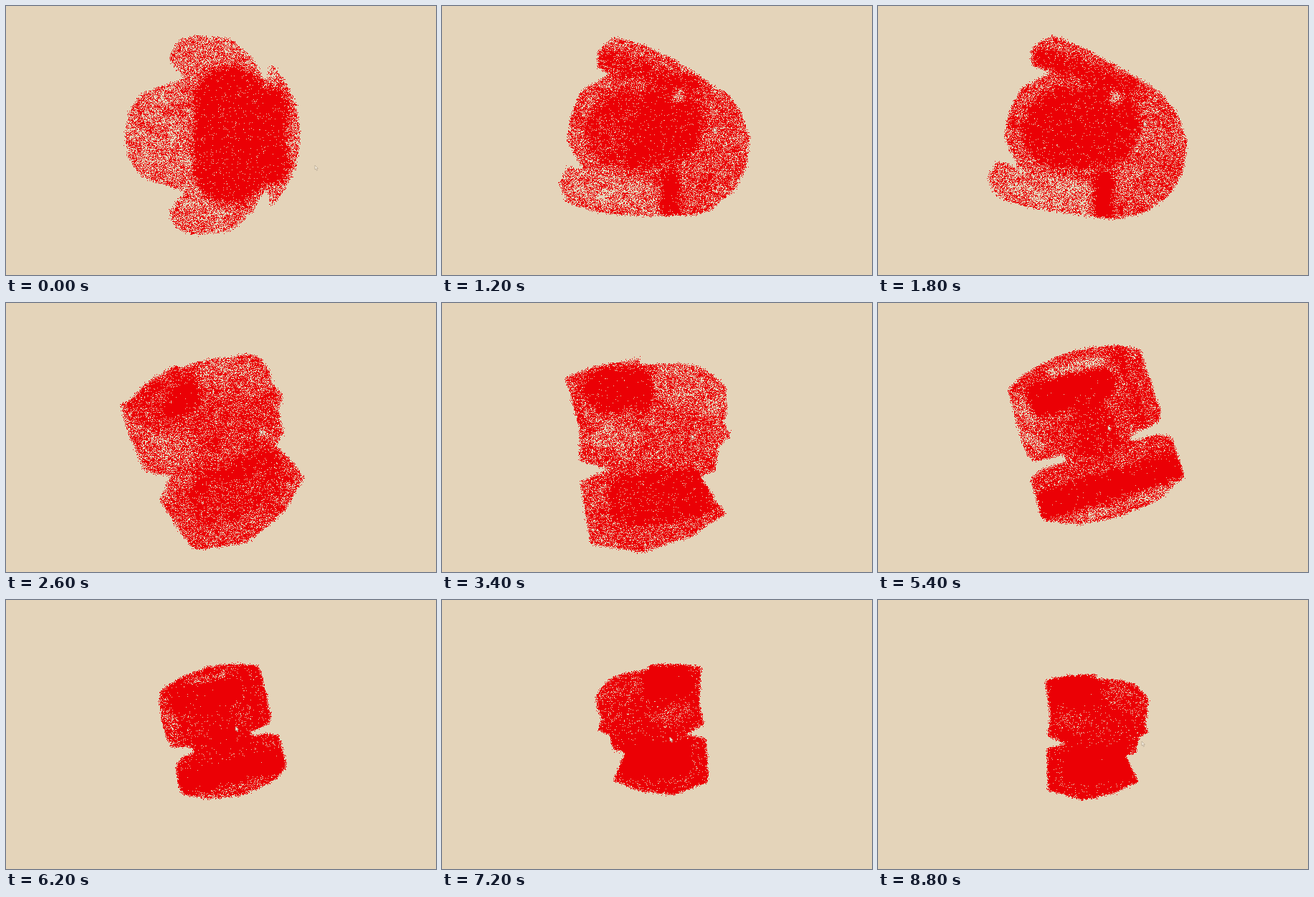
Animation of 600 by 375 pixels, one loop 9 s. Source, as an HTML page with a canvas:

```html
<!DOCTYPE html>
<html lang="en">
<head>
<meta charset="utf-8">
<title>Rotating point cloud bust</title>
<style>
  html, body { margin: 0; width: 100%; height: 100%; overflow: hidden; background: #e4d4ba; }
  canvas { display: block; }
</style>
</head>
<body>
<canvas id="stage" width="600" height="375"></canvas>
<script>
const W = 600, H = 375, LOOP = 9000, STEP = 200, SAMPLES = 200;

const lerp = (a, b, w) => a + (b - a) * w;
const parse = text => text.split(' ').map(pair => pair.split(',').map(Number));

// Mirrors an outline left to right; it still starts at the top and runs clockwise.
const mirror = ([first, ...rest]) => [first, ...rest.reverse()].map(([x, y]) => [-x, y]);
const symmetric = half => [...half, ...mirror(half).slice(1)];

// Spreads points evenly along a closed outline, so that any two outlines can blend.
function resample(points) {
  const sides = points.map((a, i) => {
    const b = points[(i + 1) % points.length];
    return { a, b, length: Math.hypot(b[0] - a[0], b[1] - a[1]) };
  });
  const gap = sides.reduce((sum, side) => sum + side.length, 0) / SAMPLES;
  let i = 0, passed = 0;
  return Array.from({ length: SAMPLES }, (_, n) => {
    while (passed + sides[i].length < n * gap) passed += sides[i++].length;
    const { a, b, length } = sides[i], w = (n * gap - passed) / length;
    return [lerp(a[0], b[0], w), lerp(a[1], b[1], w)];
  });
}

// Views of the bust, upright around 0,0. Folds: density, width, line from, line to.
const views = {
  crown: {
    outline: symmetric(parse('0,-137 28,-134 58,-114 79,-53 106,-76 130,-66 139,-41 134,10 108,40 80,56 72,60 100,67 78,85 42,102 0,108')),
    base: .53,
    folds: [[.97, 105, -46, 10, 46, 10], [.98, 44, -48, 70, 48, 70]]
  },
  tilted: {
    outline: symmetric(parse('0,-126 36,-122 69,-90 72,-120 96,-125 119,-106 118,-60 102,30 92,66 72,98 40,122 0,130')),
    base: .7,
    folds: [
      [.48, 46, -93, -109, -81, 15], [.97, 112, 0, -50, 22, 0],
      [.95, 30, 86, -105, 86, 20], [1, 28, -46, 29, -111, 48], [0, 13, 66, 7, 66, 8]
    ]
  },
  profile: {
    outline: parse('-5,-134 -2,-125 53,-120 81,-111 110,-82 108,-48 101,-32 110,-11 90,0 82,34 59,38 88,95 38,120 -32,135 -104,114 -107,26 -64,14 -105,-3 -99,-48 -110,-120 -67,-131'),
    base: .76,
    folds: [
      [.98, 60, -60, -98, -15, -92], [.58, 50, 36, -96, 92, -64],
      [.55, 36, -67, -33, -33, -24], [.97, 75, -37, 60, 40, 60]
    ]
  },
  front: {
    outline: symmetric(parse('0,-145 45,-140 82,-131 112,-117 115,-8 104,8 56,12 55,24 95,24 120,34 120,104 70,127 0,134')),
    base: .7,
    folds: [
      [.98, 55, -62, -85, 32, -81], [.9, 60, 5, -40, 5, 10], [.25, 16, -39, -122, 48, -118],
      [.45, 28, -103, -91, -94, -10], [.97, 9, 77, -115, 82, 0],
      [.97, 46, -117, 80, 122, 82], [.4, 16, -95, 122, 115, 116]
    ]
  }
};
views.reverse = {
  ...views.profile,
  outline: mirror(views.profile.outline),
  folds: views.profile.folds.map(([density, width, x1, y1, x2, y2]) => [density, width, -x1, y1, -x2, y2])
};
for (const view of Object.values(views)) view.outline = resample(view.outline);

const keys = [
  { time: 0, view: 'crown', scale: 1, turn: -90, x: 303, y: 180, pointer: [431, 222] },
  { time: 1800, view: 'tilted', scale: 1, turn: -71, x: 303, y: 188, pointer: [371, 161] },
  { time: 3400, view: 'profile', scale: 1, turn: -7, x: 296, y: 210, pointer: [348, 183] },
  { time: 4600, view: 'front', scale: 1, turn: -17, x: 303, y: 187, pointer: [320, 173] },
  { time: 4800, view: 'front', scale: 1.14, turn: -17, x: 303, y: 187, pointer: [320, 172] },
  { time: 5000, view: 'front', scale: 1.14, turn: -17, x: 303, y: 187, pointer: [321, 171] },
  { time: 6000, view: 'front', scale: .66, turn: -17, x: 302, y: 188, pointer: [321, 171] },
  { time: 7200, view: 'reverse', scale: .68, turn: -5, x: 294, y: 182, pointer: [318, 191] },
  { time: 7700, view: 'front', scale: .64, turn: 10, x: 300, y: 193, pointer: [335, 194] },
  { time: 8800, view: 'profile', scale: .65, turn: 0, x: 305.5, y: 191, pointer: [368, 197] }
];

function layer() {
  const canvas = document.createElement('canvas');
  canvas.width = W;
  canvas.height = H;
  return canvas.getContext('2d', { willReadFrequently: true });
}

const stage = document.getElementById('stage').getContext('2d');
const shade = layer(), field = layer();

const setPose = (ctx, { x, y, turn, scale }) =>
  ctx.setTransform(new DOMMatrix().translate(x, y).rotate(turn).scale(scale));

function fillShape(ctx, points) {
  ctx.beginPath();
  points.forEach(([x, y]) => ctx.lineTo(x, y));
  ctx.closePath();
  ctx.fill();
}

const grey = density => `hsl(0 0% ${density * 100}%)`;

function addShade({ base, folds }, pose, weight) {
  shade.resetTransform();
  shade.filter = 'none';
  shade.fillStyle = grey(base);
  shade.fillRect(0, 0, W, H);
  setPose(shade, pose);
  shade.filter = `blur(${4 * pose.scale}px)`;
  shade.lineCap = 'round';
  for (const [density, width, x1, y1, x2, y2] of folds) {
    shade.strokeStyle = grey(density);
    shade.lineWidth = width;
    shade.beginPath();
    shade.moveTo(x1, y1);
    shade.lineTo(x2, y2);
    shade.stroke();
  }
  field.globalAlpha = weight;
  field.drawImage(shade.canvas, 0, 0);
  field.globalAlpha = 1;
}

function hash(x, y, seed) {
  let h = Math.imul(x, 374761393) ^ Math.imul(y, 668265263) ^ Math.imul(seed + 1, 974634777);
  h = Math.imul(h ^ h >>> 13, 1274126177);
  h = Math.imul(h ^ h >>> 15, 2246822519);
  return ((h ^ h >>> 16) >>> 0) / 2 ** 32;
}

function smoothNoise(x, y) {
  const ix = Math.floor(x), iy = Math.floor(y), u = x - ix, v = y - iy;
  return lerp(
    lerp(hash(ix, iy, 99), hash(ix + 1, iy, 99), u),
    lerp(hash(ix, iy + 1, 99), hash(ix + 1, iy + 1, 99), u), v);
}

// Scatters red points according to the density field.
function scatter(scale, seed) {
  const image = field.getImageData(0, 0, W, H), data = image.data;
  for (let p = 0; p < data.length; p += 4) {
    const x = p / 4 % W, y = Math.floor(p / 4 / W);
    let d = data[p] * data[p + 3] / 65025;
    if (d) {
      d = 1 - (1 - d) ** (1 / scale ** 2);
      const blotch = smoothNoise(x / 11, y / 8) + smoothNoise(x / 4, y / 3) - 1;
      d += d * (1 - d) * blotch * 1.3;
    }
    data.set(hash(x, y, seed) < d ? [235, 0, 5, 255] : [228, 212, 186, 255], p);
  }
  stage.putImageData(image, 0, 0);
}

function drawPointer(x, y) {
  stage.setTransform(1, 0, 0, 1, x, y);
  stage.fillStyle = '#f4ecdd';
  fillShape(stage, parse('0,0 0,6 1.5,5 2.5,7.5 3.5,7 2.6,4.6 4.4,4.4'));
  stage.strokeStyle = '#a99b85';
  stage.lineWidth = .6;
  stage.stroke();
}

function draw(step) {
  const time = step * STEP;
  const i = keys.findIndex((key, n) => n && time <= key.time);
  const from = keys[i - 1], to = keys[i];
  const w = Math.sin((time - from.time) / (to.time - from.time) * Math.PI / 2);
  const blend = name => lerp(from[name], to[name], w);
  const pose = { x: blend('x'), y: blend('y'), turn: blend('turn'), scale: blend('scale') };
  const a = views[from.view], b = views[to.view];

  field.resetTransform();
  field.globalCompositeOperation = 'source-over';
  addShade(a, pose, 1);
  addShade(b, pose, w);

  setPose(field, pose);
  field.globalCompositeOperation = 'destination-in';
  field.filter = 'blur(1.6px)';
  fillShape(field, a.outline.map((p, n) => p.map((v, axis) => lerp(v, b.outline[n][axis], w))));
  field.filter = 'none';

  scatter(pose.scale, step);
  drawPointer(...from.pointer.map((v, axis) => lerp(v, to.pointer[axis], w)));
}

let shown = -1;
function tick() {
  const step = Math.floor(performance.now() % LOOP / STEP);
  if (step !== shown) draw(shown = step);
  requestAnimationFrame(tick);
}
tick();
</script>
</body>
</html>
```
